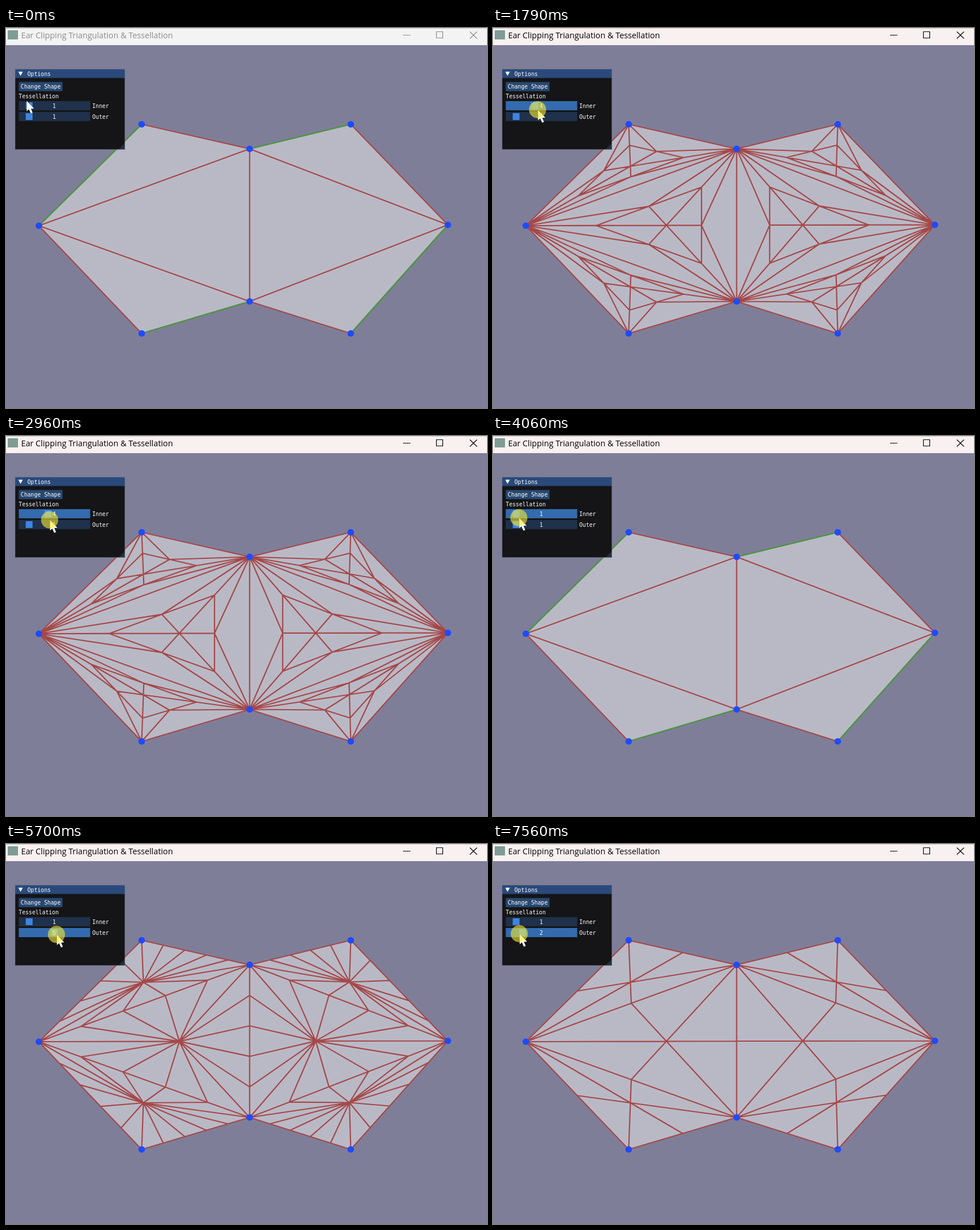
Write an HTML page with a canvas that moves like this. It is 842 px wide and 665 px high and loops after 7630 ms.

```html
<!DOCTYPE html>
<html lang="en">
<head>
<meta charset="utf-8">
<title>Ear Clipping Triangulation &amp; Tessellation</title>
<style>
  html, body { margin: 0; width: 842px; height: 665px; overflow: hidden; background: #7f7e99; }
  canvas { display: block; }
</style>
</head>
<body>
<canvas id="stage" width="842" height="665"></canvas>
<script>
const ctx = document.getElementById('stage').getContext('2d');
const LOOP = 7630, RED = '#a54848', GREEN = '#3fa03f';
const UI_FONT = '9.7px "DejaVu Sans Mono", monospace';
const TITLE_FONT = '14.25px "Open Sans", sans-serif';
const STEP = 11, ZERO_X = 29.5;   // slider pixels per level, and where level 0 sits

// Outline, clockwise from the top left; ears are clipped off around the middle.
const outline = [[237, 168], [426, 211], [603, 168], [773, 344],
                 [603, 534], [426, 478], [237, 534], [57, 345.5]].map(p => p.map(v => v + 0.5));
const triangles = ['701', '715', '756', '123', '135', '345'].map(s => [...s].map(i => outline[i]));
const greenEdges = ['70', '12', '34', '56'].map(s => [...s].map(i => outline[i]));

const linear = k => k;
const smooth = k => k * k * (3 - 2 * k);
const easeOut = k => 1 - (1 - k) ** 2;

function lerp(a, b, k) {
  return a.map((v, i) => v + (b[i] - v) * k);
}

// The pointer drags the inner slider up and back, then the outer one.
function pointerAt(t) {
  let x = 36, y = 127;
  const move = (start, end, dx, dy, ease) => {
    const k = ease(Math.min(1, Math.max(0, (t - start) / (end - start))));
    x += dx * k;
    y += dy * k;
  };
  move(70, 140, 4, 5, linear);
  move(410, 2070, 46.3, 13.2, linear);
  move(2460, 2960, 0, 2.8, linear);
  move(2460, 4060, -40.6, -5, smooth);
  move(4260, 4530, -1.7, 7, linear);
  move(4730, 5970, 51, 9.5, smooth);
  move(6340, 7560, -48.5, -2.5, easeOut);
  return [x, y];
}

function line(a, b) {
  ctx.moveTo(...a);
  ctx.lineTo(...b);
}

function polygon(points, fill) {
  ctx.beginPath();
  points.forEach(p => ctx.lineTo(...p));
  ctx.closePath();
  ctx.fillStyle = fill;
  ctx.fill();
}

function rect(x, y, w, h, fill) {
  ctx.fillStyle = fill;
  ctx.fillRect(x, y, w, h);
}

function dot([x, y], r, fill) {
  ctx.beginPath();
  ctx.arc(x, y, r, 0, 7);
  ctx.fillStyle = fill;
  ctx.fill();
}

function text(s, x, y, align = 'left', font = UI_FONT, fill = '#fff') {
  ctx.font = font;
  ctx.textAlign = align;
  ctx.fillStyle = fill;
  ctx.fillText(s, x, y);
}

function split(a, b, n) {
  return n < 1 ? [a] : Array.from({ length: n + 1 }, (_, i) => lerp(a, b, i / n));
}

// Joins a subdivided edge to the matching edge of the next ring inward.
function stitch(outer, inner) {
  const m = outer.length - 1, q = inner.length - 1;
  let i = 0, j = 0;
  line(outer[0], inner[0]);
  while (i < m || j < q) {
    const nextOuter = i < m ? (i + 0.5) / m : 2;
    const nextInner = j < q ? (j + 1.5) / (q + 2) : 2;
    if (nextOuter <= nextInner + 1e-6) i++; else j++;
    line(outer[i], inner[j]);
  }
}

function tessellate(tri, innerLevel, outerLevel) {
  const n = innerLevel === 1 && outerLevel > 1 ? 2 : innerLevel;
  const center = [0, 1].map(k => (tri[0][k] + tri[1][k] + tri[2][k]) / 3);
  const ring = segs => tri.map(p => lerp(center, p, segs / n));
  for (let segs = n; segs > 0; segs -= 2) {
    const now = ring(segs), next = ring(segs - 2);
    for (let e = 0; e < 3; e++) {
      const f = (e + 1) % 3;
      line(now[e], now[f]);
      if (segs > 1)
        stitch(split(now[e], now[f], segs === n ? outerLevel : segs), split(next[e], next[f], segs - 2));
    }
  }
}

function drawShape(inner, outer) {
  polygon(outline, '#b9b9c6');
  ctx.lineWidth = 2.2;
  ctx.strokeStyle = RED;
  ctx.beginPath();
  for (const tri of triangles) tessellate(tri, inner, outer);
  ctx.stroke();
  if (inner === 1 && outer === 1) {
    ctx.strokeStyle = GREEN;
    ctx.beginPath();
    for (const edge of greenEdges) line(...edge);
    ctx.stroke();
  }
  for (const p of outline) dot(p, 5.8, '#1f4bff');
}

function drawTitle(active) {
  const ink = active ? '#000' : '#8c8c8c';
  rect(0, 0, 842, 30, active ? '#f9f1f0' : '#f3f3f3');
  rect(0, 0, 842, 1, '#c4c2c4');
  rect(3, 4, 18, 16, '#7f9c94');
  text('Ear Clipping Triangulation & Tessellation', 26.5, 17.5, 'left', TITLE_FONT, ink);
  ctx.strokeStyle = ink;
  ctx.lineWidth = 1.2;
  ctx.beginPath();
  line([695, 12.5], [708, 12.5]);
  line([812, 6.5], [824.5, 18.5]);
  line([824.5, 6.5], [812, 18.5]);
  ctx.rect(753.5, 6.5, 11, 11);
  ctx.stroke();
}

function drawSlider(y, label, value, state) {
  rect(22.4, y, 125, 16, { idle: '#1f314b', hover: '#274870', active: '#336bae' }[state]);
  rect(ZERO_X - 6 + value * STEP, y + 2, 12, 12, state === 'active' ? '#4296fa' : '#3d85e0');
  text(value, 84.5, y + 11.5, 'center');
  text(label, 151, y + 11.5);
}

function drawPanel(inner, outer, innerState, outerState) {
  rect(16, 72, 192, 140.5, 'rgba(15,15,15,.94)');
  rect(16, 72, 192, 15.5, '#294a7a');
  ctx.strokeStyle = 'rgba(110,110,128,.5)';
  ctx.lineWidth = 1;
  ctx.strokeRect(16, 72, 192, 140.5);
  polygon([[208, 202], [208, 212], [198, 212]], 'rgba(66,150,250,.2)');
  polygon([[21.5, 76.5], [29.5, 76.5], [25.5, 83.5]], '#fff');
  text('Options', 37.5, 83.5);
  rect(22.4, 94.5, 76.6, 16, '#274870');
  text('Change Shape', 25.8, 106);
  text('Tessellation', 22.3, 122.8);
  drawSlider(128, 'Inner', inner, innerState);
  drawSlider(147, 'Outer', outer, outerState);
}

function drawPointer([x, y], pressed) {
  const arrow = [[0, 0], [0, 19], [4, 15.5], [7.5, 23], [11, 21.5], [8, 14.5], [13.5, 14]];
  polygon(arrow.map(([dx, dy]) => [x + dx, y + dy]), '#fff');
  ctx.strokeStyle = 'rgba(0,0,0,.6)';
  ctx.lineWidth = 0.7;
  ctx.stroke();
  if (pressed) dot([x - 0.5, y], 15, 'rgba(250,235,50,.6)');
}

function draw(t) {
  const tip = pointerAt(t);
  const level = Math.round((tip[0] - ZERO_X) / STEP);
  const dragInner = t >= 410 && t < 4260, dragOuter = t >= 4730;
  const inner = dragInner ? level : 1, outer = dragOuter ? level : 1;
  const dragging = dragInner || dragOuter;
  const state = (drag, y) => drag ? 'active' : !dragging && tip[1] >= y && tip[1] < y + 16 ? 'hover' : 'idle';

  rect(0, 0, 842, 665, '#7f7e99');
  drawShape(inner, outer);
  drawTitle(t >= 410);
  drawPanel(inner, outer, state(dragInner, 128), state(dragOuter, 147));
  drawPointer(tip, dragging);
}

function tick() {
  draw(performance.now() % LOOP);
  requestAnimationFrame(tick);
}
tick();
</script>
</body>
</html>
```
